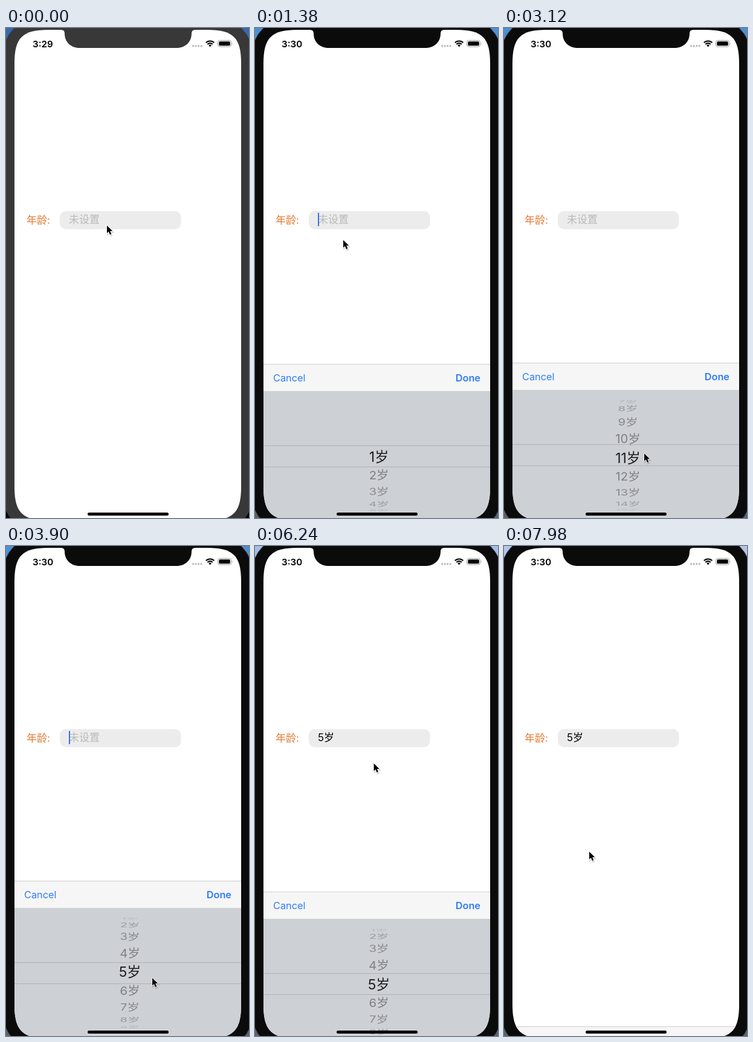
Write an HTML page that moves like this. It is 402 by 811 pixels and loops after 8 s.

```html
<!DOCTYPE html>
<html lang="zh">
<head>
<meta charset="utf-8">
<title>Age picker</title>
<style>
  html, body { margin: 0; width: 100%; height: 100%; overflow: hidden; background: #fff; }
  svg { display: block; width: 402px; height: 811px; }
  text { font: 17px Inter, "Noto Sans CJK SC", "Noto Sans CJK", sans-serif; }
  .clock { font-size: 15.2px; font-weight: 600; }
  .bar { font-size: 16.3px; fill: #2f7cf6; }
  .bold { font-weight: 600; }
  .row { text-anchor: middle; }
  #dim text { font-size: 20.3px; fill: #7b7c7f; }
  #lit text { font-size: 23px; fill: #1c1d1f; }
</style>
</head>
<body>
<svg viewBox="0 0 402 811">
  <defs>
    <clipPath id="screen">
      <path d="M14 59C14 16 27 3 70 3H333C376 3 389 16 389 59V759C389 802 376 815 333 815H70C27 815 14 802 14 759Z"/>
    </clipPath>
    <clipPath id="outside"><path d="M0 45H402V135H0ZM0 171H402V261H0Z"/></clipPath>
    <clipPath id="inside"><rect y="135" width="402" height="36"/></clipPath>
    <path id="arrow" d="M0 0V12.6L2.9 10L5 15L7.3 14L5.2 9.1H9.2Z"/>
  </defs>
  <rect id="sky" width="402" height="400"/>
  <rect id="ground" y="400" width="402" height="411"/>
  <rect id="body" x="-5" y="-16" width="413" height="850" rx="60" stroke="#3b4048"/>
  <g clip-path="url(#screen)">
    <rect width="402" height="815" fill="#fff"/>
    <text x="34" y="324" fill="#e27a35">年龄:</text>
    <rect x="89" y="303" width="200.5" height="30" rx="10" fill="#ececec"/>
    <text id="value" x="104" y="323"></text>
    <rect id="caret" y="306" width="2" height="22" fill="#3a6fe6"/>
    <g id="panel">
      <rect width="402" height="45" fill="#f6f6f6"/>
      <rect width="402" height="1" fill="#cfcfd1"/>
      <text class="bar" x="30" y="29">Cancel</text>
      <text class="bar bold" x="373" y="29" text-anchor="end">Done</text>
      <rect y="45" width="402" height="217" fill="#cdd0d4"/>
      <g id="dim" clip-path="url(#outside)"></g>
      <g id="lit" clip-path="url(#inside)"></g>
      <path d="M0 135.5H402M0 170.5H402" stroke="#aeb1b6"/>
    </g>
    <rect x="135" y="802" width="134" height="5" rx="2.5"/>
  </g>
  <path id="notch" d="M91 0V3Q97 3 97 9C97 23 107 33 122 33H282C297 33 307 23 307 9Q307 3 313 3V0Z"/>
  <text id="clock" class="clock" x="44" y="31.5"></text>
  <path d="M309.6 29.7h.01m4.5 0h.01m4.5 0h.01m4.5 0h.01" stroke="#bcbcbe" stroke-width="3.4" stroke-linecap="round"/>
  <g fill="none" stroke="#000" stroke-width="2.1">
    <path d="M330.8 24.3a9.6 9.6 0 0 1 13.6 0M333.4 26.9a5.9 5.9 0 0 1 8.4 0"/>
    <path d="M337.6 31.2l-2.4-2.4a3.4 3.4 0 0 1 4.8 0Z" fill="#000" stroke="none"/>
  </g>
  <rect x="350.5" y="20.5" width="22" height="10.5" rx="3" fill="none" stroke="#9c9c9e"/>
  <rect x="352.3" y="22.3" width="18.4" height="7" rx="1.6"/>
  <path d="M374 23.8q1.6 2 0 4Z" fill="#9c9c9e"/>
  <g id="cursor">
    <use href="#arrow" x="1" y="2" opacity=".15" stroke="#000" stroke-width="2"/>
    <use href="#arrow" stroke="#fff" stroke-width="1.4" stroke-linejoin="round" paint-order="stroke"/>
  </g>
</svg>
<script>
const LOOP = 8000, STEP = 60, ACTIVATE = 360, NEW_MINUTE = 720;
const OPEN = [997, 6000], CLOSE = [4700, 7750];
const ROW_ANGLE = Math.PI / 9, RADIUS = 91;
const $ = id => document.getElementById(id);
const set = (id, name, value) => $(id).setAttribute(name, value);

// Moves are [start, end, ...destination].
const mouseMoves = [
  [1000, 1380, 146, 351],  // off the field
  [1440, 1800, 230, 702],  // to the wheel
  [2950, 3600, 242, 715],  // drag back
  [3960, 4500, 350, 577],  // Done
  [4760, 5280, 251, 507],
  [5340, 5800, 190, 318],  // field again
  [6100, 6780, 250, 699],
  [7020, 7560, 62, 577],   // Cancel
  [7700, 7980, 141, 506]
];
const wheelMoves = [[1800, 2706, 12], [2950, 3600, 5.3], [3780, 3960, 5]];

function ease(t, start, end) {
  const u = Math.min(1, Math.max(0, (t - start) / (end - start)));
  return u * u * (3 - 2 * u);
}

const travel = (from, moves, t) => moves.reduce(
  (p, [start, end, ...to]) => p.map((v, i) => v + (to[i] - v) * ease(t, start, end)), from);

// Critically damped spring from 0 to 1
function spring(ms) {
  const x = Math.max(0, ms) * 0.01826;
  return 1 - (1 + x) * Math.exp(-x);
}

function makeRows(id) {
  return Array.from({ length: 9 }, () => {
    const row = document.createElementNS("http://www.w3.org/2000/svg", "text");
    row.setAttribute("class", "row");
    row.setAttribute("dy", ".37em");
    return $(id).appendChild(row);
  });
}
const rowSets = [makeRows("dim"), makeRows("lit")];

function turnWheel(v) {
  for (const rows of rowSets) rows.forEach((row, i) => {
    const n = Math.round(v) + i - 4, a = (n - v) * ROW_ANGLE;
    const c = Math.max(0.04, Math.cos(a));
    row.textContent = n < 1 ? "" : n + "岁";
    row.setAttribute("transform", `translate(205 ${153 + RADIUS * Math.sin(a)}) scale(1 ${c})`);
    row.setAttribute("opacity", c ** 0.65);
  });
}

function draw(t) {
  const active = t >= ACTIVATE, chosen = t >= CLOSE[0];
  const bezel = active ? "#0b0b0c" : "#383838";
  const sky = active ? travel([76, 144, 210], [[3900, 6960, 176, 198, 232]], t) : [58, 104, 172];
  set("body", "fill", bezel);
  set("notch", "fill", bezel);
  set("sky", "fill", `rgb(${sky.map(Math.round)})`);
  set("ground", "fill", active ? "#5c636d" : "#020204");
  $("clock").textContent = t < NEW_MINUTE ? "3:29" : "3:30";

  $("value").textContent = chosen ? "5岁" : "未设置";
  set("value", "fill", chosen ? "#000" : "#b9b9bd");
  const focused = OPEN.some((start, i) => t >= start && t < CLOSE[i]);
  const blink = (t + 630) % 1000 < 560;
  set("caret", "x", chosen ? 131 : 104);
  set("caret", "visibility", focused && blink ? "visible" : "hidden");

  const lift = OPEN.reduce((sum, start, i) => sum + spring(t - start) - spring(t - CLOSE[i]), 0);
  set("panel", "transform", `translate(0 ${Math.round(815 - 261 * lift)})`);
  turnWheel(travel([1], wheelMoves, t)[0]);
  set("cursor", "transform", `translate(${travel([167, 327], mouseMoves, t)})`);
}

function frame() {
  const t = performance.now() % LOOP;
  draw(t - t % STEP);
  requestAnimationFrame(frame);
}
frame();
</script>
</body>
</html>
```
